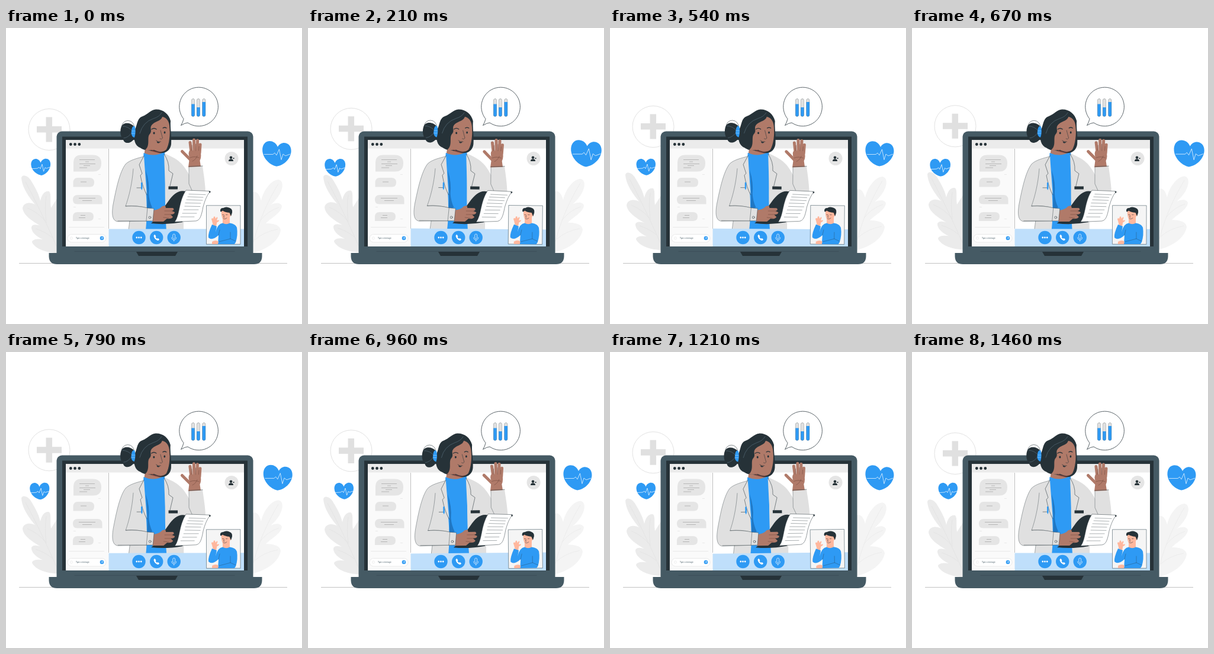
An HTML page that plays this animation: 500 px wide and 500 px high, repeating every 1.5 s.

```html
<!DOCTYPE html>
<html lang="en">
<head>
<meta charset="utf-8">
<title>Online doctor</title>
<style>
  html, body { margin: 0; width: 100%; height: 100%; overflow: hidden; background: #fff; }
  svg { display: block; width: 100%; height: 100%; }
  .blue { fill: #2e9af4; }
  .dark { fill: #263238; }
  .slate { fill: #455a64; }
  .grey { fill: #e0e0e0; }
  .pale { fill: #e5e5e5; }
  .skin { fill: #b07a69; }
  .peach { fill: #ffb79d; }
  .line { fill: none; stroke: #263238; stroke-width: .55; stroke-linecap: round; stroke-linejoin: round; }
  .crease { stroke: #70483c; }
  .strand { stroke: #607887; }
  .brow { stroke-width: 1.3; }
  .soft { fill: none; stroke: #999; stroke-width: .6; }
  .white { fill: none; stroke: #fff; stroke-width: .7; stroke-linejoin: round; }
</style>
</head>
<body>
<svg viewBox="0 0 500 500">
  <clipPath id="screen"><path d="M173.500 330H402V369H173.500Z"/></clipPath>

  <!-- plants and cross -->
  <g class="float">
    <path fill="#ebebeb" d="M26 253C27 246 38 249 43 259C50 270 56 282 58 292C60 281 66 274 73 276C77 280 74 293 76 304L88 285V380C70 380 50 374 44 362C44 356 56 356 62 357C50 352 42 343 43 336C45 331 52 332 58 334C46 327 29 317 28 304C30 294 42 294 49 298C40 287 27 270 26 253Z"/>
    <path fill="none" stroke="#e0e0e0" stroke-width=".6" d="M33 260C50 292 66 325 86 370M36 304Q55 312 66 326M68 283Q65 302 68 329M50 339Q66 344 78 354"/>
    <path fill="#f4f4f4" d="M416 380V278C424 274 429 283 431 292C434 276 447 257 460 256C470 258 468 272 461 283C456 291 451 295 447 299C454 295 464 294 466 301C465 313 447 321 439 330C447 330 463 331 464 342C461 360 440 375 416 380Z"/>
    <path fill="none" stroke="#e6e6e6" stroke-width=".6" d="M460 263C444 290 428 322 418 362M461 303Q442 309 429 326M459 340Q436 344 420 358"/>
    <circle cx="73" cy="171.500" r="35" fill="#fff" stroke="#e2e2e2"/>
    <path class="grey" d="M67.500 150.500H78V166H94V176.500H78V192.500H67.500V176.500H52V166H67.500Z"/>
  </g>
  <path class="soft" d="M22 397.500H475"/>

  <!-- laptop -->
  <rect class="slate" x="85.500" y="174.500" width="332" height="215" rx="9"/>
  <path class="dark" d="M95 183.500H408V369H95Z"/>
  <path fill="#fff" d="M101 189.300H402V369H101Z"/>
  <path fill="#fafafa" d="M101 203H173.500V369H101Z"/>
  <path fill="#ebebeb" d="M101 189.300H402V203.500H101Z"/>
  <g class="dark"><circle cx="109.300" cy="196.500" r="2.400"/><circle cx="116.500" cy="196.500" r="2.400"/><circle cx="123.800" cy="196.500" r="2.400"/></g>
  <path class="slate" d="M72.500 380H432.500V386Q432 399 419 399H86Q73 399 72.500 386Z"/>
  <path class="line" d="M116 377.300H386" opacity=".5"/>
  <path class="dark" d="M220 378H290L286 385H224Z"/>

  <!-- chat -->
  <g class="pale">
    <path d="M114 242.500V228Q114 214.500 127 214.500H147Q161 215 161 228.500Q161 242.500 147 242.500Z"/>
    <path d="M113.500 268.500V261Q114 253 121 253H141Q149 253 149 261T141 268.500Z"/>
    <path d="M162.500 297.500V290Q162 282 155 282H121Q113 282 113 290T121 297.500Z"/>
    <path d="M113 326V319Q113 311 121 311H140Q148 311 148 318.500T140 326Z"/>
  </g>
  <path class="soft" d="M124 222.500H150M134 226H140M124 229.500H151M131 232.500H142M124 236H137M126 260H136M123 287.500H151M129 291.500H145M126 316.500H134M123 320.500H134"/>
  <path fill="none" stroke="#ddd" stroke-width=".6" d="M106 336.500H166M156 247.500H160M114 302.500H118M156 322.500H160"/>
  <rect x="104" y="348.500" width="65" height="13.500" rx="6.700" fill="#fff" stroke="#ddd" stroke-width=".6"/>
  <circle cx="110.500" cy="355" r="2" fill="none" stroke="#ddd" stroke-width=".5"/>
  <text x="118" y="356.300" font-family="Lato, sans-serif" font-size="3.300" fill="#455a64">Type a message</text>
  <circle class="blue" cx="162" cy="355" r="3.300"/>
  <path class="white" d="M160.500 355L163.500 353.700L162.300 356.500"/>
  <path class="soft" d="M173.500 204V339"/>
  <circle class="pale" cx="381" cy="220.500" r="11.500"/>
  <g class="dark"><circle cx="380" cy="218.700" r="2.300"/><path d="M376 225Q376 221.300 380 221.300T384 225Z"/><path d="M383.500 219.300H385.500V221H383.500Z"/></g>

  <!-- speech bubble -->
  <path d="M300 153.500A32.800 32.800 0 1 1 307 160Q302 160.500 295.500 164.500Q299 159 300 153.500Z" fill="#fff" stroke="#263238" stroke-width=".75"/>
  <g id="tubes"></g>

  <!-- doctor -->
  <g id="doctor">
    <path class="grey" d="M233 217C222 220 209 223 202 230C192 243 186 272 181 298C178 316 180 326 189 327L209 326L207 342H300V300L337 290C338 270 334 248 332 233L308.500 234L309.500 248C305 240 300 232 294 227C287 220 277 216 268 212Z"/>
    <path class="line" d="M233 217C222 220 209 223 202 230C192 243 186 272 181 298C178 316 180 326 189 327L238 326M215 238C213 265 207 287 202 301Q220 299 238 304M209 326L207 342M309 234V263L314 274" opacity=".7"/>
    <path class="skin" d="M236 196L233 216Q248 224 268 214V203Z"/>
    <path class="blue" d="M232.500 211Q250 219 268 209C270 243 267 278 271 342H236C240 310 237 265 231 240Z"/>
    <path fill="#1f77c4" d="M236 240Q243 262 241 280Q242 293 247 303L238 308Q240 270 236 240Z"/>
    <path class="grey" d="M233 216L225 231L230 246L227 249L238 282Q235 246 233 216ZM267 213Q276 226 275 241L282 246L277 276L270 285Q268 245 267 213Z"/>
    <path class="line" d="M233 216L225 231L230 246L227 249Q231 270 238 282M267 213Q276 226 275 241L282 246L277 267M221 270H230"/>
    <path class="blue" d="M228 261H230.500V271L229.300 274L228 271Z"/>
    <path class="dark" d="M274.500 267.500H290V272.500H274.500Z"/>

    <circle class="line" cx="206" cy="167" r="10.500"/>
    <path class="dark" d="M195 166C199 158 211 160 216 166L217 186C211 197 199 196 198 188C193 184 192 173 195 166Z"/>
    <path class="line strand" d="M197 166Q207 166 214 175Q206 186 199 186"/>
    <path class="dark" d="M253 137.500C245 138 239 146 231 149C221 152 222 164 218 171C215 183 216 196 224 201C229 203 232 207 239 206L258 211C270 213 278 206 279 196C280 181 277 168 278 157C275 145 265 137 253 137.500Z"/>
    <path class="blue" d="M212.500 170Q214 165 217.500 166Q220 175 217 185Q212 184 211.500 177Z"/>
    <path class="white" d="M212 174H218M212 178H218" opacity=".5"/>
    <path class="skin" d="M264 150C270 151 275 156 276 165C278 180 275.500 197 271 205C266 211 256 209 250 206Q240 207 235 206C244 199 238 186 242 180C249 173 240 169 248 162C254 157 262 157 264 150Z"/>
    <path d="M244 204Q254 211 267 208Q257 213 248 209Z" fill="#b8503f" opacity=".5"/>
    <path class="line strand" d="M226 178Q231 159 249 153Q259 150 263 143"/>
    <g class="dark"><ellipse cx="250" cy="177.500" rx="1.500" ry="1.900"/><ellipse cx="268" cy="176.500" rx="1.400" ry="1.900"/></g>
    <path class="line brow" d="M246 171Q250 168 254 171M265 169Q268 167 271 169"/>
    <path class="line" d="M261 173Q263 181 264.500 186Q263 189 260 187M253.500 190Q257 193 261.500 192"/>
    <path d="M254.500 191.500Q257 193 260.500 192.500Q258.500 195.500 255.500 194Z" fill="#263238"/>

    <path class="skin" d="M308 235L310 219Q307 211 310 207L328 207Q331 217 327.500 224L329 234Z"/>
    <path fill="none" stroke="#b07a69" stroke-width="5" stroke-linecap="round" stroke-linejoin="round" d="M312 223L303 214L297.500 208.500M313 210L311 193.500M318 209L317.500 189M323 209L323.500 190M327 211L328 197"/>
    <path class="line crease" d="M313.500 207L314 198M320.500 207V196M325.500 207L326 200M311 219Q318 216 326 219M315 225Q321 222 323 216"/>
    <path class="line" d="M309 234L332 233"/>

    <path class="dark" d="M245 330C254 324 262 309 274 293C283 280 292 273 304 276L306 281L298 328Q270 333 245 330Z"/>
    <path d="M304 274L345 275.500C338 285 336 292 333 302C330 319 327 326 319 326L285 327.500C294 316 291 294 304 274Z" fill="#fff" stroke="#263238" stroke-width=".5"/>
    <path class="line" d="M309 280.500L337 281.500M307 285L333 286M305 290L332 291M303 295.500L329 296M302 301L328 301.500M300 307L325 307M298 313L322 313M295 319L318 319" opacity=".7"/>
    <path class="dark" d="M342.500 275.500L346 276.500L344 279Z"/>
    <path class="skin" d="M248 308Q259 307 264 301L269 300L270 304L282 304Q286 307 280 309L285 311Q285 315 278 315L282 319Q280 323 272 322L266 327H247Z"/>
    <path class="line crease" d="M268 309L281 309M268 315L279 315M266 320L275 321"/>
    <path class="grey" d="M205 301Q224 300 239 304L250 305L248 326H196Z"/>
    <path class="line" d="M202 301Q224 300 239 304L250 305L248 326H189M239 304L237 326" opacity=".8"/>
    <circle class="line" cx="243" cy="320" r="1.900"/>
  </g>

  <!-- call bar -->
  <g clip-path="url(#screen)"><path id="bar" fill="#bfdffb" d="M165 339.500H410V380H165Z"/></g>
  <g class="blue"><circle cx="224.500" cy="354" r="11.200"/><circle cx="254.200" cy="354" r="11.200"/><circle cx="283.700" cy="354" r="11.200"/></g>
  <g fill="#fff">
    <circle cx="220.800" cy="354" r="1.400"/><circle cx="224.500" cy="354" r="1.400"/><circle cx="228.200" cy="354" r="1.400"/>
    <path d="M251.500 349L253.500 352L252.500 353.500L255 356L256.500 355L259 357Q258 360 255 358.500Q250 355.500 249.500 351Q250 349 251.500 349Z"/>
  </g>
  <rect class="white" x="281.800" y="348" width="3.800" height="8" rx="1.900"/>
  <path class="white" d="M279.700 353.500Q280 358 283.700 358T287.700 353.500M283.700 358V360.500"/>

  <!-- patient -->
  <g id="patient">
    <path d="M338.500 299.800H396V365.300H338.500Z" fill="#f5f5f5" stroke="#455a64" stroke-width=".6"/>
    <path class="peach" d="M350 334L348 326L347 323Q347.500 320 350 322L351 318.500L353 318.500L354 322L356.500 319L357.500 320.500L356 325L360 324.500Q360 327 356.500 328L355 335ZM366 317L366 331Q373 336 378 330V317Z"/>
    <path class="blue" d="M366 329.500Q372 333 378 329.500Q388 331 390 337Q392 350 388 362L386 365H358L359 350Q348 360 342 354Q341 347 348 332L356 335L354 345Q357 331 366 329.500Z"/>
    <path class="peach" d="M348 361Q355 357 359 361L358 365H348Z"/>
    <path class="line" d="M359 350L361 341M379 345V356L360 361M379 356L388 360" stroke-opacity=".6"/>
    <path class="peach" d="M363.500 309Q371 306 379 311Q381 311 381 315Q380 318 378.500 318Q377 327 370 326Q364 325 363.500 309Z"/>
    <path class="dark" d="M362 310Q361 304 367 304Q372 301 378 304Q383 306 382 312L380 318L377.500 312Q369 311 366 308.500Q364 311 362 310Z"/>
    <path class="line" d="M365.500 315.500H367.500M371.500 315.500H374M368.500 316L367.500 319.500H369M367 322Q370 324 373 321"/>
  </g>

  <!-- hearts -->
  <g id="hearts">
    <path class="blue" d="M62 248.700C55 248 45 241 44.500 231C44 219 57 217.500 60.500 227.500C64 218 77 218.500 77 230C77 239 70 247 62 248.700Z"/>
    <path class="white" d="M46 237.500L55 237L58 235L60 237.500L63 230L65.500 242L68 235.500L70 237L76 235"/>
    <path class="blue" d="M455 233.500C446 232 433 222 431.500 208C430 188 451 186.500 457 201C463 189.500 480 193 479.500 208C479 221 467 232 455 233.500Z"/>
    <path class="white" d="M434 213.500L449 213.500L452 211L455 215L459.500 205L463 222.500L466 213L470 216L478 213"/>
  </g>
</svg>
<script>
  const LOOP = 1500;
  const $ = id => document.getElementById(id);
  const floating = document.querySelector('.float');

  $('tubes').innerHTML = [[316, 128.5], [324.9, 134], [334.3, 125]].map(([x, level]) => `
    <rect x="${x - 2.7}" y="119.500" width="5.400" height="30" rx="2.700" fill="#e0e0e0"/>
    <path class="blue" d="M${x - 2.7} ${level}h5.400V146.800a2.700 2.700 0 0 1-5.400 0Z"/>
    <rect class="line" x="${x - 2.7}" y="119.500" width="5.400" height="30" rx="2.700" opacity=".45"/>`).join('');

  // Linear interpolation through [time, value] pairs.
  function track(keys, t) {
    const i = keys.findIndex(k => k[0] > t);
    const [t0, a] = keys[i - 1], [t1, b] = keys[i];
    return a + (b - a) * (t - t0) / (t1 - t0);
  }

  const beat = [[0, 1], [150, 1.1], [450, 1], [600, 1], [720, 1.092], [828, 1], [LOOP, 1]];
  const sway = [[0, 0], [375, 1], [1125, -1], [LOOP, 0]];

  const pose = (el, transform) => el.setAttribute('transform', transform);

  function draw(now) {
    const t = (now + 14) % LOOP;
    const angle = track(sway, t);
    const lift = 2.9 * (Math.cos(2 * Math.PI * t / LOOP) - 1);
    pose($('hearts'), `translate(261.5 220) scale(${track(beat, t)}) translate(-261.5 -220)`);
    pose($('doctor'), `rotate(${angle} 263 238)`);
    pose($('bar'), `rotate(${angle * 0.8} 288 354)`);
    pose($('patient'), `rotate(${angle} 367 332.5)`);
    pose(floating, `translate(0 ${lift})`);
  }

  const start = performance.now();
  function tick() {
    draw(performance.now() - start);
    requestAnimationFrame(tick);
  }
  tick();
</script>
</body>
</html>
```
